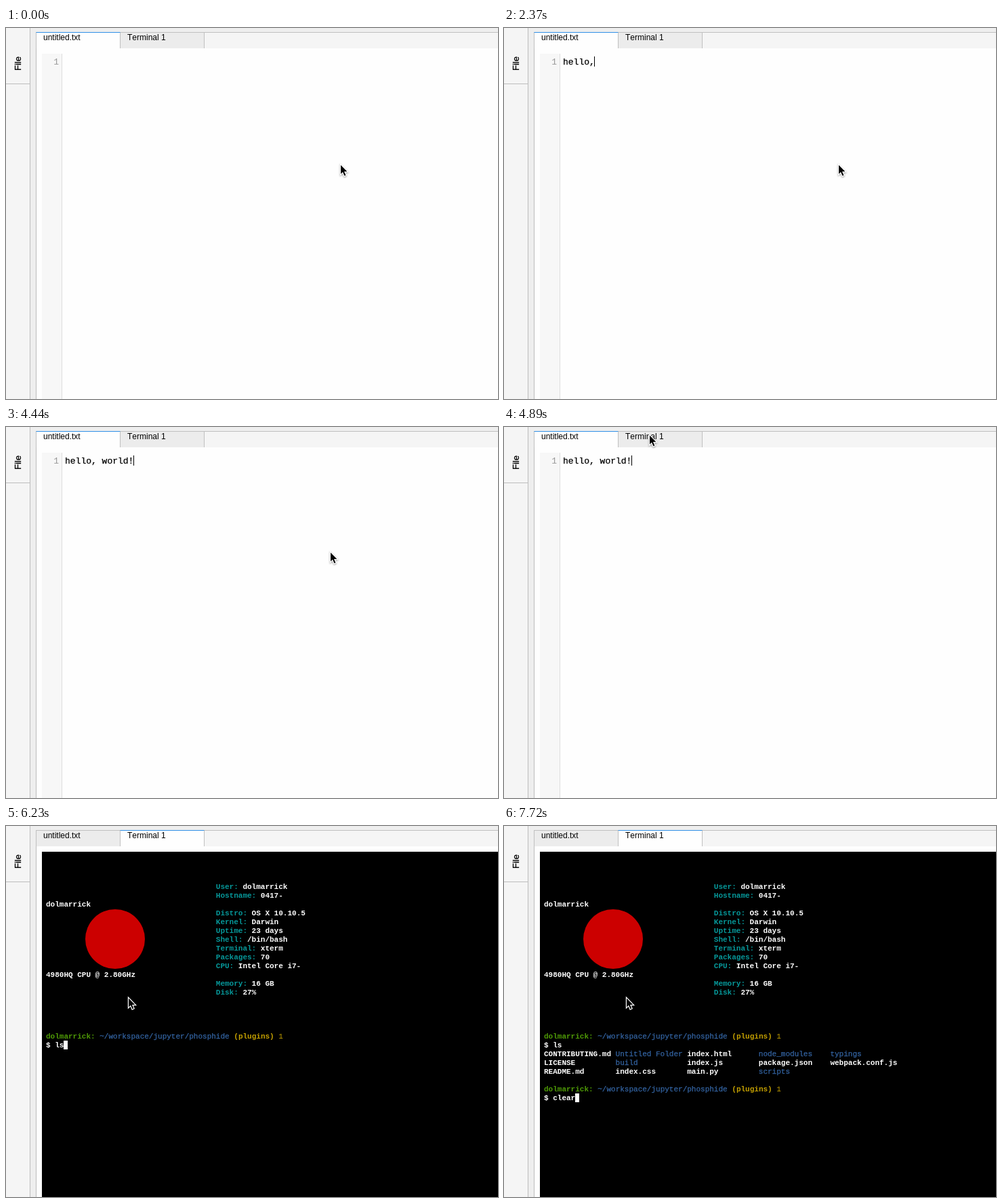
An HTML page for the animation above (8000 ms loop, 726 px wide and 548 px high).

```html
<!DOCTYPE html>
<html lang="en">
<head>
<meta charset="utf-8">
<title>Editor and terminal</title>
<style>
  html, body { margin: 0; width: 100%; height: 100%; overflow: hidden; background: #eee; }
  #stage { position: relative; width: 726px; height: 548px; overflow: hidden; background: #eee;
    font: 12px/14px "Liberation Sans", Arial, sans-serif; font-kerning: none; color: #000; }
  #stage div, #stage pre, #stage svg { position: absolute; box-sizing: border-box; margin: 0; }
  #side { left: 0; top: 0; width: 36px; height: 548px; background: #f5f5f5; border-right: 1px solid #bdbdbd; }
  #side div { left: 0; top: 82px; width: 35px; height: 1px; background: #bdbdbd; }
  #side text { font-size: 13px; stroke: #000; stroke-width: .3px; }
  #panel { left: 44px; top: 6px; width: 682px; height: 542px; background: #fefefe; border-left: 1px solid #bdbdbd; }
  #bar { left: 0; top: 0; width: 681px; height: 24px; background: #f5f5f5; border-top: 1px solid #c0c0c0; }
  .tab { top: 6px; width: 125px; height: 24px; padding: 0 10px; background: #ececec;
    border: 1px solid #c0c0c0; border-bottom: 0; }
  .tab.on { background: #fefefe; border-top-color: #2f8fe6; }
  #editor, #term { left: 53px; top: 38px; width: 673px; height: 510px; overflow: hidden; }
  #editor { background: #fefefe; font: 13px/15px "Liberation Mono", "Courier New", monospace; }
  #gutter { left: 0; top: 0; width: 30px; height: 510px; padding: 5px 4px 0 0; text-align: right;
    background: #f7f7f7; border-right: 1px solid #ddd; color: #999; }
  #typed { left: 34px; top: 5px; font: inherit; -webkit-text-stroke: .25px #000; }
  #caret { top: 4px; width: 1px; height: 15px; background: #000; }
  #term { background: #000; color: #fff; font: bold 11px/13px "Liberation Mono", "Courier New", monospace; }
  #term pre { font: inherit; }
  #badge { left: 64px; top: 85px; width: 88px; height: 88px; border-radius: 50%; background: #c00; }
  #block { width: 6px; height: 13px; background: #fff; }
  #ring { left: 485px; top: 190px; width: 21px; height: 21px; border-radius: 50%;
    border: 1px solid #000; box-shadow: inset 0 0 0 1px #fff; }
  #arrow { left: 0; top: 0; overflow: visible; filter: drop-shadow(0 1px 1px rgba(0,0,0,.4)); }
  .g { color: #4e9a06; }
  .y { color: #c4a000; }
  .c { color: #06989a; }
  .b { color: #3465a4; font-weight: normal; -webkit-text-stroke: .25px #3465a4; }
  .thin { font-weight: normal; }
</style>
</head>
<body>
<div id="stage">
  <div id="side">
    <div></div>
    <svg width="35" height="82"><text transform="translate(22 63) rotate(-90)">File</text></svg>
  </div>
  <div id="panel"><div id="bar"></div></div>
  <div class="tab" id="fileTab" style="left:44px">untitled.txt</div>
  <div class="tab" id="termTab" style="left:168px">Terminal 1</div>
  <div id="editor">
    <div id="gutter">1</div>
    <pre id="typed"></pre>
    <div id="caret"></div>
  </div>
  <div id="term">
    <div id="badge"></div>
    <div id="block"></div>
  </div>
  <div id="ring"></div>
  <svg id="arrow" width="13" height="19">
    <path d="M1 1.5V14.6l3-2.9 2.4 5.6 2-.9-2.4-5.3h4.3z" stroke="#fff" stroke-width="2.4" paint-order="stroke"/>
  </svg>
</div>
<script>
const LOOP = 8000, COL = 6.6, ROW = 13;
const USER = "dolmarrick";
const $ = id => document.getElementById(id);
const show = (el, on) => { el.style.visibility = on ? "visible" : "hidden"; };

// Last value of a [time, value] table that has begun at t.
const at = (steps, t) => steps.reduce((v, s) => t >= s[0] ? s[1] : v, steps[0][1]);

const term = $("term");

function line(row, col, html) {
  const el = document.createElement("pre");
  el.style.left = 6 + col * COL + "px";
  el.style.top = 7 + row * ROW + "px";
  el.innerHTML = html;
  term.appendChild(el);
  return el;
}

const prompt = row => line(row, 0,
  `<span class="g">${USER}:</span> <span class="b">~/workspace/jupyter/phosphide</span> ` +
  `<span class="y">(plugins) <span class="thin">1</span></span>`);

const info = [
  [3, "User", USER], [4, "Hostname", "0417-"], [6, "Distro", "OS X 10.10.5"],
  [7, "Kernel", "Darwin"], [8, "Uptime", "23 days"], [9, "Shell", "/bin/bash"],
  [10, "Terminal", "xterm"], [11, "Packages", "70"], [12, "CPU", "Intel Core i7-"],
  [14, "Memory", "16 GB"], [15, "Disk", "27%"]
];
info.forEach(([row, label, value]) => line(row, 38, `<span class="c">${label}:</span> ${value}`));
line(5, 0, USER);
line(13, 0, "4980HQ CPU @ 2.80GHz");
prompt(20);

const listing = [
  ["CONTRIBUTING.md", "Untitled Folder/", "index.html", "node_modules/", "typings/"],
  ["LICENSE", "build/", "index.js", "package.json", "webpack.conf.js"],
  ["README.md", "index.css", "main.py", "scripts/"]
];
const output = [prompt(26)];
listing.forEach((names, r) => names.forEach((name, c) => {
  const text = name.endsWith("/") ? `<span class="b">${name.slice(0, -1)}</span>` : name;
  output.push(line(22 + r, 16 * c, text));
}));
const shell = [line(21, 0, ""), line(27, 0, "")];

const SWITCH = 5040, RUN = 6530;
const HELLO = "hello, world!";
const helloLen = [[0, 0], [1480, 1], [1630, 3], [1770, 4], [2070, 5], [2370, 6], [2520, 7],
  [2660, 9], [2800, 10], [3100, 11], [3250, 12], [3540, 13]];
const caretOn = [[0, false], [1040, true], [3990, false], [4440, true]];
const ringOn = [[0, false], [140, true], [290, false], [1040, true], [1180, false]];
const lsLen = [[0, 0], [6080, 1], [6230, 2]];
const clearLen = [[0, 0], [7280, 1], [7430, 2], [7580, 4], [7720, 5]];
const blockOn = [[0, false], [5940, true], [6980, false], [7280, true]];
const pointer = [[0, [493, 201]], [3840, [492, 200]], [4440, [478, 184]], [4590, [430, 135]],
  [4740, [356, 65]], [4890, [214, 11]], [5490, [209, 40]], [5640, [195, 130]],
  [5790, [182, 235]], [5940, [180, 253]]];

function draw(t) {
  const inTerm = t >= SWITCH, ran = t >= RUN;
  $("fileTab").className = inTerm ? "tab" : "tab on";
  $("termTab").className = inTerm ? "tab on" : "tab";
  $("fileTab").style.zIndex = inTerm ? 0 : 1;
  $("editor").style.display = inTerm ? "none" : "block";
  term.style.display = inTerm ? "block" : "none";

  const n = at(helloLen, t);
  $("typed").textContent = HELLO.slice(0, n);
  $("caret").style.left = Math.floor(34 + n * 7.8) + "px";
  show($("caret"), at(caretOn, t));
  show($("ring"), at(ringOn, t));

  const ls = at(lsLen, t), clear = at(clearLen, t);
  shell[0].textContent = "$ " + "ls".slice(0, ls);
  shell[1].textContent = "$ " + "clear".slice(0, clear);
  [...output, shell[1]].forEach(el => { el.style.display = ran ? "block" : "none"; });

  const block = $("block");
  block.style.left = Math.round(6 + (2 + (ran ? clear : ls)) * COL) + "px";
  block.style.top = 6 + (ran ? 27 : 21) * ROW + "px";
  show(block, inTerm && at(blockOn, t));

  const [x, y] = at(pointer, t);
  $("arrow").style.transform = `translate(${x}px, ${y}px)`;
}

const start = performance.now();
function tick() {
  draw((performance.now() - start) % LOOP);
  requestAnimationFrame(tick);
}
tick();
</script>
</body>
</html>
```
